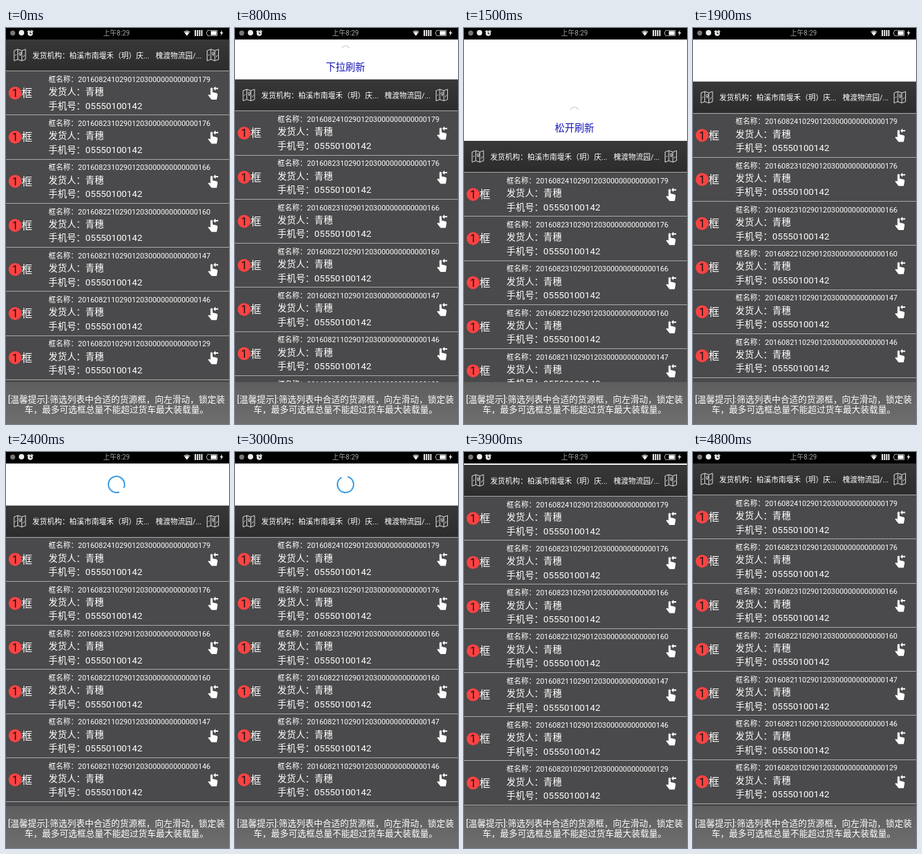
Recreate the animation shown at these times as an HTML page with a canvas. Size 331x586 px, loop 4.9 s.

```html
<!DOCTYPE html>
<html lang="zh-CN">
<head>
<meta charset="utf-8">
<style>
  html, body { margin: 0; width: 331px; height: 586px; overflow: hidden; background: #000; }
  canvas { display: block; }
</style>
</head>
<body>
<canvas id="stage" width="331" height="586"></canvas>
<script>
const ctx = document.getElementById('stage').getContext('2d');
const LOOP = 4900, STEP = 100;
const W = 331, BAR = 17, HEADER = 46, ROW = 65.25, TIP_TOP = 524;
const PULL = 150, REST = 62.5;
const FONT = 'Roboto, "Noto Sans CJK SC", "Noto Sans CJK", sans-serif';
const CRATES = [[24, 179], [23, 176], [23, 166], [22, 160], [21, 147], [21, 146], [20, 129]];

const progress = (t, from, to) => Math.min(1, Math.max(0, (t - from) / (to - from)));
const easeOut = (p, power) => 1 - (1 - p) ** power;

function pullOffset(t) {
  if (t < 1700) return PULL * easeOut(progress(t, 600, 1500), 2);
  if (t < 3600) return PULL - (PULL - REST) * easeOut(progress(t, 1700, 1900), 2);
  return REST * (1 - easeOut(progress(t, 3600, 4000), 2.5));
}

function text(str, x, middle, size, color = '#fff', align = 'left') {
  ctx.font = `${size}px ${FONT}`;
  ctx.textAlign = align;
  ctx.fillStyle = color;
  ctx.fillText(str, x, middle + size * 0.37);
}

function rect(x, y, w, h, color) {
  ctx.fillStyle = color;
  ctx.fillRect(x, y, w, h);
}

function shade(y, h, top, bottom) {
  const g = ctx.createLinearGradient(0, y, 0, y + h);
  g.addColorStop(0, top);
  g.addColorStop(1, bottom);
  rect(0, y, W, h, g);
}

function disc(x, y, r, color) {
  ctx.beginPath();
  ctx.arc(x, y, r, 0, 7);
  ctx.fillStyle = color;
  ctx.fill();
}

function arc(x, y, r, start, end, color, width) {
  ctx.beginPath();
  ctx.arc(x, y, r, start, end);
  ctx.strokeStyle = color;
  ctx.lineWidth = width;
  ctx.stroke();
}

// Places an SVG path at (x, y), filled or stroked.
function icon(d, x, y, color, width) {
  const path = new Path2D(d);
  ctx.save();
  ctx.translate(x, y);
  if (width) {
    ctx.strokeStyle = color;
    ctx.lineWidth = width;
    ctx.stroke(path);
  } else {
    ctx.fillStyle = color;
    ctx.fill(path);
  }
  ctx.restore();
}

const MAP = 'M.5 2.5L6 .5L12 2.5L17.5 .5V15.5L12 17.5L6 15.5L.5 17.5ZM6 .5V15.5M12 2.5V17.5M2 10L4 8M8 6Q10 3 11 6L9.5 10ZM14 12L16 9';
const HAND = 'M4 2.2Q5.7 .5 7.2 2.2V8L13 9.3Q15 10 14.6 12L13.2 19H5.6L.5 12.6Q1 10.6 4 12.3Z';
const SWIPE = 'M8.2 4L11.5 .8V2.9H15.5V5.1H11.5V7.2Z';

function statusBar() {
  rect(0, 0, W, BAR, '#000');
  disc(10, 7.5, 3.7, '#777');
  disc(23, 7, 4, '#eee');
  disc(36, 8, 3.8, '#eee');
  arc(36, 8, 4.7, 3.6, 4.4, '#eee', 1.3);
  arc(36, 8, 4.7, 5, 5.8, '#eee', 1.3);
  icon('M0 -2V.5H2', 36, 8, '#000', 1);
  text('上午8:29', 164, 7.5, 10, '#aaa', 'center');
  icon('M0 3Q5 -1 10 3L5 9Z', 263.5, 2.5, '#999');
  icon('M2 5Q5 2.5 8 5L5 9Z', 263.5, 2.5, '#fff');
  for (let i = 0; i < 4; i++) rect(280 + i * 3.2, 3, 2, 9, '#eee');
  icon('M2 .5H16.5V8.5H2V6H.5V3H2Z', 297, 3, '#999', 1);
  rect(304, 4.5, 8.5, 6, '#fff');
  icon('M3 0L0 5H2L1 9L5 3.5H2.8Z', 317.5, 3, '#eee');
}

function header(y) {
  shade(y, HEADER, '#383838', '#2c2c2c');
  icon(MAP, 11.5, y + 14, '#ddd', 1);
  text('发货机构：柏溪市南堰禾（玥）庆...', 39, y + 23.5, 11);
  text('槐渡物流园/...', 222, y + 23.5, 11);
  icon(MAP, 298, y + 14, '#ddd', 1);
}

function row([day, serial], y) {
  rect(0, Math.round(y), W, 1, '#aaa');
  disc(13.5, y + 33.3, 9.6, '#fb4343');
  text('1', 13.5, y + 33.3, 16, '#111', 'center');
  text('框', 23, y + 33.3, 16);
  text(`框名称：201608${day}102901203000000000000${serial}`, 63, y + 12.7, 10.95);
  text('发货人：青穗', 63, y + 31, 13.7);
  text('手机号：05550100142', 63, y + 51.5, 13.7);
  icon(HAND, 299.5, y + 24, '#fff');
  icon(SWIPE, 299.5, y + 22.5, '#fff');
}

function refreshPanel(t, top) {
  rect(0, BAR, W, top - BAR, '#fff');
  if (t < 1800) {
    arc(164, top - 44, 6, 3.5, 5.9, '#ccc', 1.2);
    text(top - BAR < REST ? '下拉刷新' : '松开刷新', 164, top - 19, 14.6, '#1616b8', 'center');
  } else if (t >= 2000) {
    const turn = (t - 3000) / 1000 * 2 * Math.PI;
    arc(164, top - 31.5, 12, turn - 1.3, turn + 4.2, '#3d9be0', 2);
  }
}

function tip() {
  shade(TIP_TOP, 586 - TIP_TOP, '#5e5e5e', '#6e6e6e');
  text('[温馨提示]:筛选列表中合适的货源框，向左滑动，锁定装', 164, 549, 13, '#fff', 'center');
  text('车，最多可选框总量不能超过货车最大装载量。', 164, 564, 13, '#fff', 'center');
}

function draw(now) {
  const t = Math.floor(now % LOOP / STEP) * STEP;
  const top = BAR + pullOffset(t);
  const listTop = top + HEADER;
  rect(0, 0, W, 586, '#4a494b');
  refreshPanel(t, top);
  header(top);
  CRATES.forEach((crate, i) => row(crate, listTop + i * ROW));
  rect(0, Math.round(listTop + CRATES.length * ROW), W, 1, '#aaa');
  tip();
  statusBar();
  requestAnimationFrame(draw);
}
requestAnimationFrame(draw);
</script>
</body>
</html>
```
